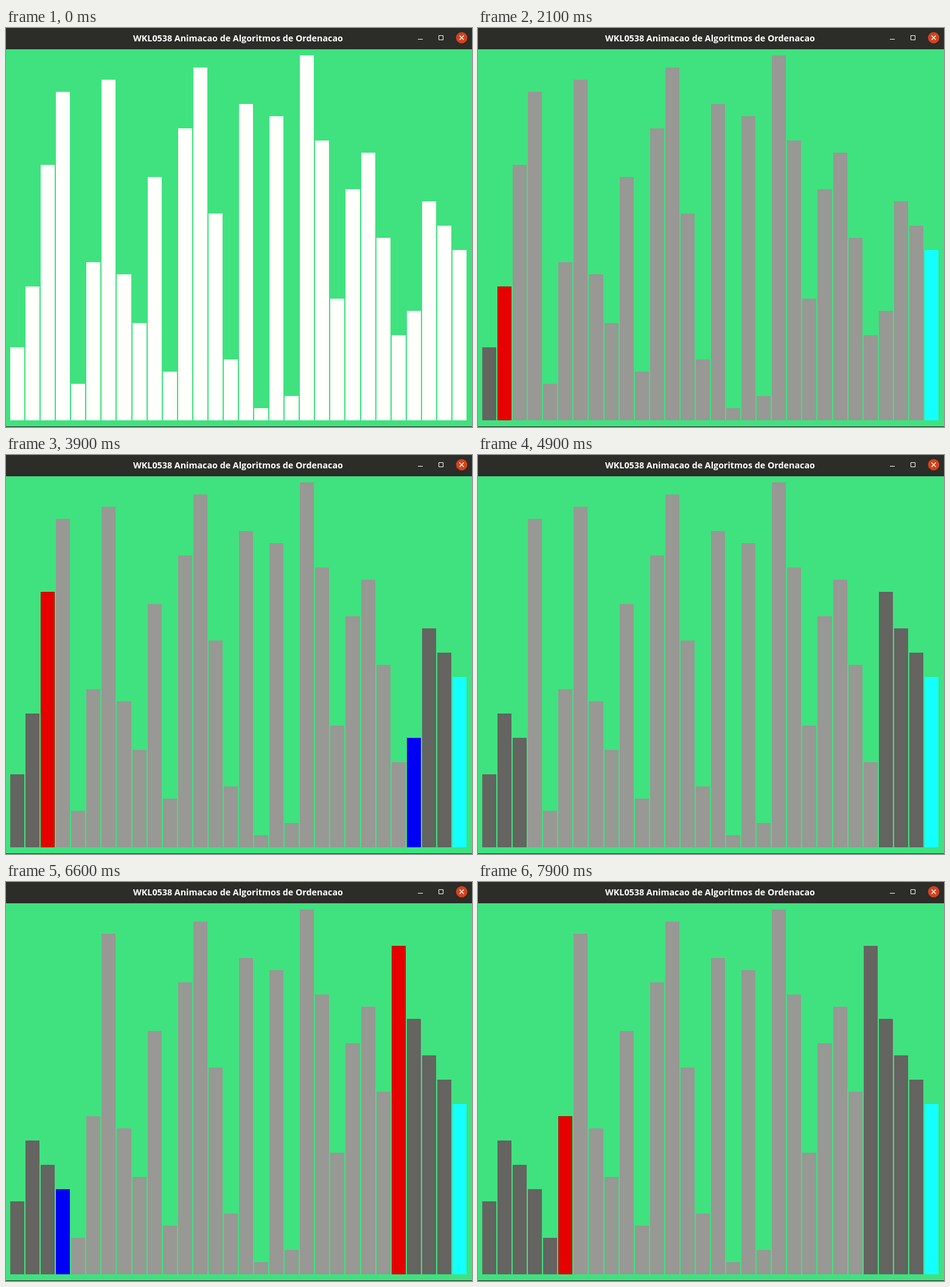
Write an HTML page that moves like this. It is 766x656 px and loops after 8000 ms.

```html
<!DOCTYPE html>
<html lang="pt">
<head>
<meta charset="utf-8">
<title>Algoritmos de Ordenacao</title>
<style>
  html, body { margin: 0; height: 100%; overflow: hidden; background: #3fe27f; }
  svg { display: block; }
  text { font: 700 14.3px "Open Sans", "Noto Sans", sans-serif; fill: #fff; text-anchor: middle; }
</style>
</head>
<body>
<svg width="766" height="656" viewBox="0 0 766 656">
  <rect width="766" height="656" fill="#3fe27f"/>
  <rect width="766" height="35" fill="#2c2c28"/>
  <rect y="655" width="766" height="1" fill="#2c2c28"/>
  <text x="381.5" y="22">WKL0538 Animacao de Algoritmos de Ordenacao</text>
  <circle cx="749" cy="16" r="9.3" fill="#d4421c"/>
  <g fill="none" stroke="#fff">
    <path d="M677 18.5h8M711.5 12.5h7v7h-7z"/>
    <path d="M745.5 12.5l7 7m0-7l-7 7" stroke-width="1.4"/>
  </g>
  <g id="bars" shape-rendering="crispEdges"></g>
</svg>
<script>
const LOOP = 8000, BASE = 645, UNIT = 20, PITCH = 752 / 30;
const WHITE = '#fffffc', GREY = '#989894', DONE = '#646460';
const PIVOT = '#14ffff', LEFT = '#e60000', RIGHT = '#0000f4', EDGE = '#b00000';

const values = [6, 11, 21, 27, 3, 13, 28, 12, 8, 20, 4, 24, 29, 17, 5,
                26, 1, 25, 2, 30, 23, 10, 19, 22, 15, 7, 9, 18, 16, 14];

// Partition steps: time, action, bar index
const steps = [
  [1100, 'start'],
  [1400, 'left', 0], [2100, 'left', 1], [2400, 'left', 2],
  [2900, 'right', 28], [3400, 'right', 27], [3900, 'right', 26],
  [4400, 'swap'], [4900, 'release'],
  [5600, 'left', 3], [5900, 'right', 25],
  [6600, 'swap'], [6900, 'release'],
  [7400, 'left', 4], [7900, 'left', 5]
];

const group = document.getElementById('bars');
const rects = values.map((_, i) => {
  const rect = document.createElementNS('http://www.w3.org/2000/svg', 'rect');
  const x = 7 + i * PITCH, left = Math.round(x);
  rect.left = left;
  rect.span = Math.round(x + PITCH - 2) - left;
  return group.appendChild(rect);
});

function stateAt(time) {
  const bars = values.map(value => ({ value, color: WHITE }));
  const pointer = {};
  const actions = {
    start() {
      bars.forEach(bar => bar.color = GREY);
      bars[bars.length - 1].color = PIVOT;
    },
    move(side, index, color) {
      if (side in pointer) bars[pointer[side]].color = DONE;
      pointer[side] = index;
      bars[index].color = color;
    },
    left(index) { actions.move('left', index, LEFT); },
    right(index) { actions.move('right', index, RIGHT); },
    swap() {
      const { left, right } = pointer;
      [bars[left], bars[right]] = [bars[right], bars[left]];
    },
    release() {
      bars[pointer.left].color = bars[pointer.right].color = DONE;
    }
  };
  for (const [start, action, index] of steps) {
    if (time >= start) actions[action](index);
  }
  return bars;
}

function setBox(rect, x, y, width, height) {
  Object.entries({ x, y, width, height }).forEach(([name, v]) => rect.setAttribute(name, v));
}

function draw(now) {
  stateAt(now % LOOP).forEach(({ value, color }, i) => {
    const rect = rects[i], height = value * UNIT;
    const inset = color === LEFT ? 0.5 : 0;
    setBox(rect, rect.left + inset, BASE - height + inset, rect.span - 2 * inset, height - 2 * inset);
    rect.setAttribute('fill', color);
    rect.setAttribute('stroke', inset ? EDGE : 'none');
  });
  requestAnimationFrame(draw);
}
draw(performance.now());
</script>
</body>
</html>
```
